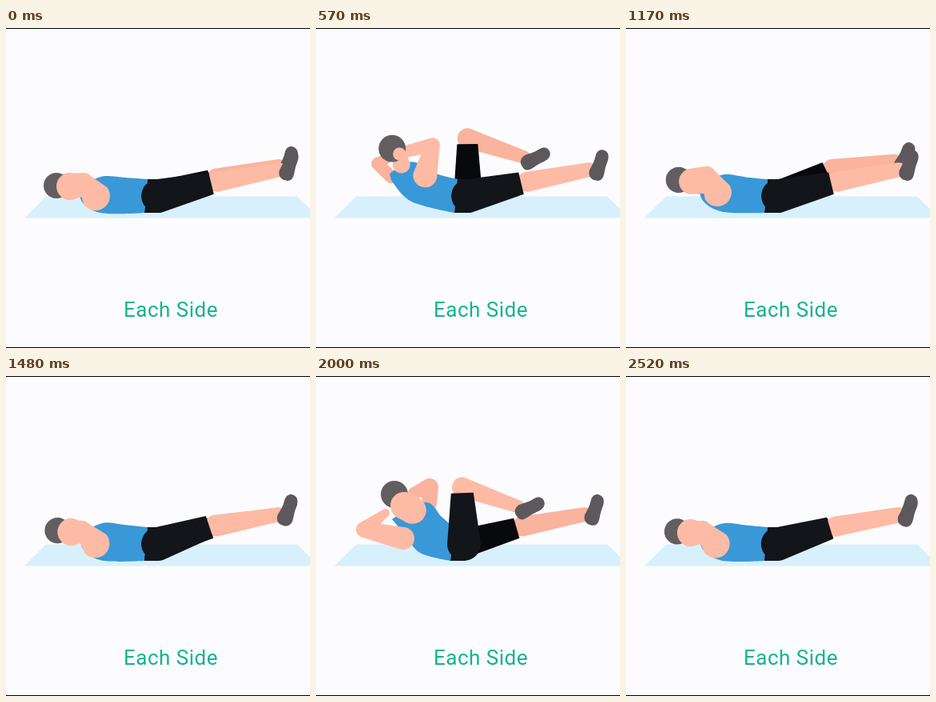
An HTML page for the animation above (2560 ms loop, 380 by 400 pixels).

```html
<!DOCTYPE html>
<html lang="en">
<head>
<meta charset="utf-8">
<title>Bicycle crunch</title>
<style>
  html, body { margin: 0; width: 100%; height: 100%; overflow: hidden; background: #fcfcfe; }
  svg { display: block; width: 100%; height: 100%; }
  text { font: 26px Roboto, sans-serif; letter-spacing: .5px; fill: url(#ink); }
</style>
</head>
<body>
<svg viewBox="0 0 380 400">
  <linearGradient id="ink" x2="0" y2="1">
    <stop offset=".2" stop-color="#0fbd88"/>
    <stop offset=".9" stop-color="#16aa96"/>
  </linearGradient>
  <rect width="380" height="400" fill="#fcfcfe"/>
  <path d="M23 237.5L50 210.5H364L380 226V237.5Z" fill="#d8f0fc"/>
  <g id="body"></g>
  <text x="147" y="361">Each Side</text>
  <path d="M0 .5H380M0 399.5H380" stroke="#000"/>
</svg>
<script>
const LOOP = 2560, RAD = Math.PI / 180;
const SKIN = '#fdbba5', FAR_SKIN = '#fab39c', HAIR = '#625e60', BLUE = '#3998d8';
const SHORTS = '#12151a', FAR_SHORTS = '#08090d', SHOE = '#5c585c';
const SHOE_PATH = 'M-19 1C-20-6-15-10-9-10C-2-9 3-8 10-9C17-10 21-5 20 0C19 6 13 8 6 7.5C0 7-6 9-11 9C-16 9-19 6-19 1Z';
const PIVOT = { x: 175, y: 210 };

// Upper body joints as [x, y, radius]: lying, then turned to each side.
const joints = {
  head:        { rest: [63, 197, 16], a: [96, 150, 17],  b: [98, 148, 17] },
  face:        { rest: [80, 198, 17], a: [105, 157, 8],  b: [110, 162, 17] },
  neck:        { rest: [96, 199, 12], a: [107, 170, 11], b: [121, 168, 17] },
  shoulder:    { rest: [112, 210, 18], a: [137, 184, 15], b: [109, 203, 14] },
  elbow:       { rest: [98, 191, 10], a: [147, 146, 9],  b: [60, 192, 10] },
  hand:        { rest: [72, 192, 10], a: [105, 156, 7],  b: [87, 171, 5] },
  farShoulder: { rest: [100, 205, 8], a: [94, 186, 8],   b: [142, 160, 9] },
  farElbow:    { rest: [85, 199, 8],  a: [77, 169, 8],   b: [142, 139, 11] },
  farHand:     { rest: [72, 196, 8],  a: [90, 162, 6],   b: [122, 146, 7] },
  collar:      { rest: [108, 190], a: [92, 182],  b: [95, 179] },
  chest:       { rest: [124, 185], a: [120, 167], b: [137, 158] },
  belly:       { rest: [150, 187], a: [150, 182], b: [157, 176] },
  back:        { rest: [118, 231], a: [120, 217], b: [130, 221] },
  blade:       { rest: [93, 213],  a: [97, 194],  b: [112, 199] }
};

// "shown" steps of "steps" appear evenly between two times.
const moves = [
  { side: 'a', from: 220, to: 610, shown: 10, steps: 10, up: true, bend: .8 },
  { side: 'a', from: 910, to: 1260, shown: 9, steps: 9, up: false, bend: 1 },
  { side: 'b', from: 1430, to: 2000, shown: 13, steps: 13, up: true, bend: 1 },
  { side: 'b', from: 2260, to: 2520, shown: 7, steps: 8, up: false, bend: 1 }
];

const lerp = (a, b, p) => a + (b - a) * p;
const smooth = u => u * u * (3 - 2 * u);
const polar = (o, deg, len) => ({ x: o.x + len * Math.cos(deg * RAD), y: o.y + len * Math.sin(deg * RAD) });

function crunchAt(t) {
  let state = { side: 'a', p: 0 };
  for (const m of moves) {
    if (t < m.from) break;
    const gap = (m.to - m.from) / (m.shown - 1);
    const step = Math.min(m.shown, Math.floor((t - m.from) / gap + .1) + 1);
    const e = smooth((step / m.steps) ** m.bend);
    state = { side: m.side, p: m.up ? e : 1 - e };
  }
  return state;
}

// A joint swings in an arc about the pivot.
function swing([x0, y0, r0 = 0], [x1, y1, r1 = 0], p) {
  const dx0 = PIVOT.x - x0, dy0 = PIVOT.y - y0, dx1 = PIVOT.x - x1, dy1 = PIVOT.y - y1;
  const angle = lerp(Math.atan2(dy0, dx0), Math.atan2(dy1, dx1), p);
  const len = lerp(Math.hypot(dx0, dy0), Math.hypot(dx1, dy1), p);
  return { x: PIVOT.x - len * Math.cos(angle), y: PIVOT.y - len * Math.sin(angle), r: lerp(r0, r1, p) };
}

// Tapered tube between two joints, round or cut flat at its end.
function limb(a, b, flat) {
  const len = Math.hypot(b.x - a.x, b.y - a.y) || 1;
  const nx = (b.y - a.y) / len, ny = (a.x - b.x) / len;
  const edge = (j, s) => `${(j.x + nx * j.r * s).toFixed(2)} ${(j.y + ny * j.r * s).toFixed(2)}`;
  const cap = j => `A${j.r} ${j.r} 0 0 1 `;
  return `M${edge(a, 1)}L${edge(b, 1)}${flat ? 'L' : cap(b)}${edge(b, -1)}L${edge(a, -1)}${cap(a)}${edge(a, 1)}Z`;
}

// Smooth closed curve; points marked sharp stay corners.
function outline(pts) {
  const n = pts.length, at = i => pts[(i + n) % n];
  const handle = (i, dir) => {
    const q = at(i), k = q.sharp ? 0 : dir / 6;
    return `${q.x + (at(i + 1).x - at(i - 1).x) * k} ${q.y + (at(i + 1).y - at(i - 1).y) * k} `;
  };
  return `M${pts[0].x} ${pts[0].y}` +
    pts.map((_, i) => `C${handle(i, 1)}${handle(i + 1, -1)}${at(i + 1).x} ${at(i + 1).y}`).join('') + 'Z';
}

function leg(hip, thighRest, bend, kneeR) {
  const thigh = lerp(thighRest, -92, bend), shin = lerp(-11, 19, bend);
  const length = lerp(76, 71, bend);
  const knee = { ...polar(hip, thigh, length), r: 12.5 };
  const ankle = { ...polar(knee, shin, lerp(79, 75, bend)), r: lerp(9, 8, bend) };
  const cuff = { ...polar(hip, thigh, length * .9), r: kneeR };
  const foot = polar(ankle, shin - 10, 14);
  return {
    shin: limb(knee, ankle),
    thigh: limb(hip, cuff, true),
    foot: `translate(${foot.x} ${foot.y}) rotate(${lerp(-70, -25, bend)})`
  };
}

const body = document.getElementById('body');
const shape = (fill, d = '', transform = '') => `<path fill="${fill}" d="${d}" transform="${transform}"/>`;

function draw(t) {
  const { side, p } = crunchAt(t);
  const j = {};
  for (const name in joints) j[name] = swing(joints[name].rest, joints[name][side], p);

  const shift = side === 'b' ? -5 * p : 0;
  const far = leg({ x: 190 + shift, y: 209, r: 18 }, -16, side === 'a' ? p : 0, 13);
  const near = leg({ x: 190 + shift, y: 210, r: 21 }, -13.5, side === 'b' ? p : 0, 14);
  const waistTop = { x: 177 + shift, y: 189, sharp: true };
  const waistBottom = { x: 173 + shift, y: 231, sharp: true };
  const torso = [{ ...j.collar, sharp: true }, j.chest, j.belly, waistTop, waistBottom, j.back, j.blade];
  const pelvis = `M${waistTop.x} 189H${192 + shift}V231H${waistBottom.x}Z`;

  body.innerHTML = [
    shape(FAR_SKIN, limb(j.farShoulder, j.farElbow) + limb(j.farElbow, j.farHand)),
    shape(FAR_SKIN, far.shin),
    shape(SHOE, SHOE_PATH, far.foot),
    shape(FAR_SHORTS, far.thigh),
    shape(SKIN, near.shin),
    shape(SHOE, SHOE_PATH, near.foot),
    shape(BLUE, outline(torso)),
    shape(SHORTS, pelvis + near.thigh),
    shape(SKIN, limb(j.face, j.neck)),
    shape(SKIN, limb(j.shoulder, j.elbow) + limb(j.elbow, j.hand)),
    shape(HAIR, limb(j.head, j.head)),
    `<circle cx="${j.head.x}" cy="${j.head.y}" r="${j.head.r}" fill="${HAIR}"/>`,
    `<circle cx="${j.face.x}" cy="${j.face.y}" r="${j.face.r}" fill="${SKIN}"/>`
  ].join('');
}

const start = performance.now();
function tick() {
  draw((performance.now() - start) % LOOP);
  requestAnimationFrame(tick);
}
draw(0);
requestAnimationFrame(tick);
</script>
</body>
</html>
```
